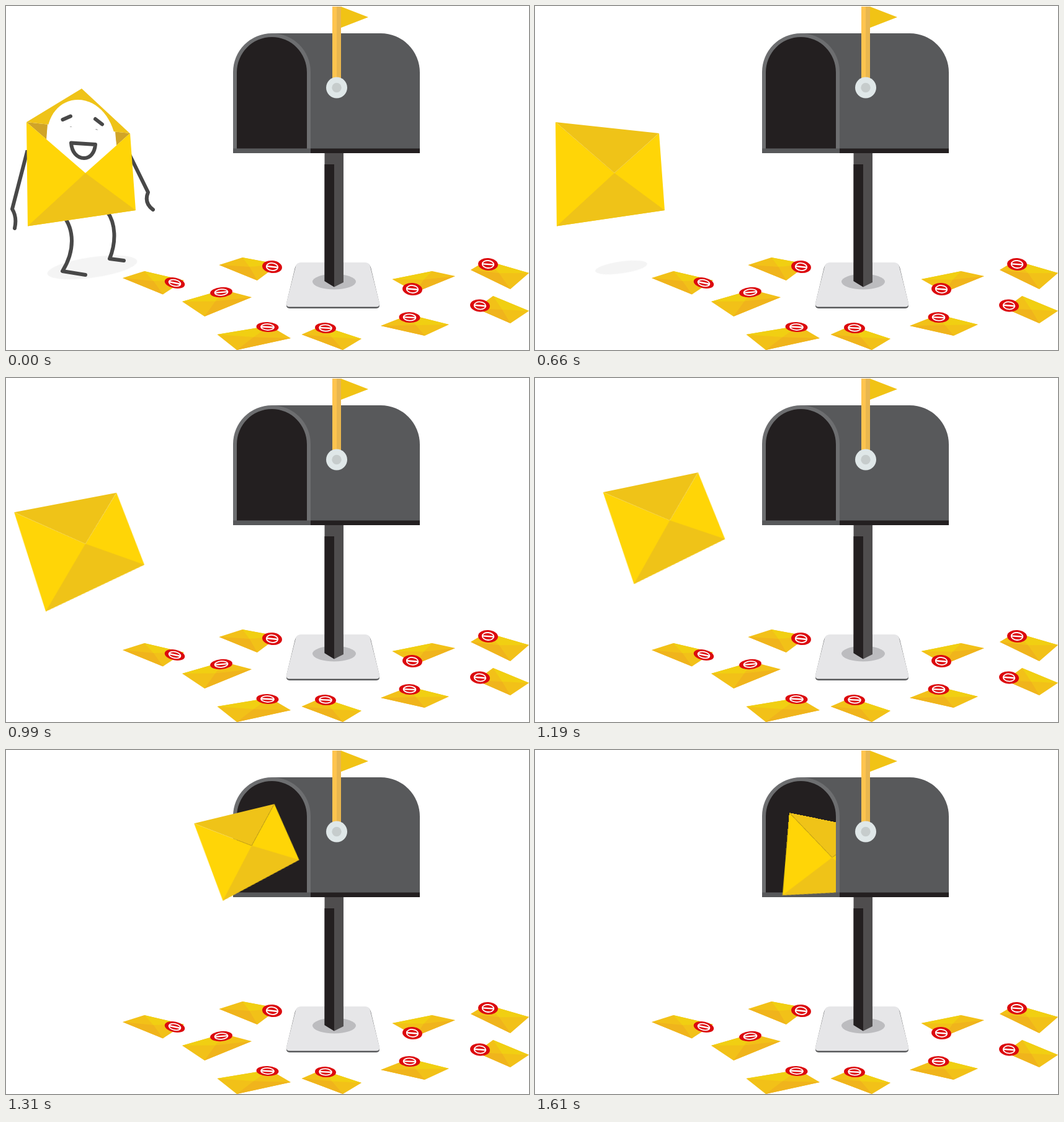
Write an HTML page that moves like this. It is 843 by 554 pixels and loops after 2.98 s.

```html
<!DOCTYPE html>
<html lang="en">
<head>
<meta charset="utf-8">
<title>Letter and mailbox</title>
<style>
html, body { margin: 0; width: 100%; height: 100%; overflow: hidden; background: #fff; }
svg { display: block; width: 100%; height: 100%; }

.letter, .flap, .limb, .open, .inner, .shadow { animation: 2980ms step-end infinite; }
.letter { animation-name: fly; }
.flap { animation-name: fold; }
.limb { animation-name: retract; fill: none; stroke: #484848; stroke-width: 6; stroke-linecap: round; stroke-linejoin: round; }
.open { animation-name: untilFold; }
.inner { animation-name: untilClosed; }
.shadow { animation-name: shrink; }

@keyframes fly {
  0% { transform: translate(128px, 269px) rotate(0deg) scale(1); }
  31.2081% { transform: translate(128px, 269px) rotate(0deg) scale(1); animation-timing-function: steps(3, start); }
  34.2282% { transform: translate(128px, 267px) rotate(-17deg) scale(1); }
  38.9262% { transform: translate(128px, 267px) rotate(-17deg) scale(1); animation-timing-function: steps(6, start); }
  44.9664% { transform: translate(396px, 154px) rotate(-19.8deg) scale(.793); animation-timing-function: steps(10, start); }
  55.0336%, 100% { transform: translate(479px, 173px) rotate(5.4deg) scale(.795); }
}
@keyframes fold {
  0% { transform: scaleY(0); }
  13.4228% { transform: scaleY(.164); }
  17.7852% { transform: scaleY(.58); }
  22.1477%, 100% { transform: scaleY(1); }
}
@keyframes retract {
  0% { transform: none; visibility: visible; }
  13.4228% { transform: translate(var(--dx), var(--dy)); visibility: visible; }
  17.7852% { transform: translate(calc(2 * var(--dx)), calc(2 * var(--dy))); visibility: visible; }
  22.1477%, 100% { transform: none; visibility: hidden; }
}
@keyframes untilFold {
  0% { visibility: visible; }
  13.4228%, 100% { visibility: hidden; }
}
@keyframes untilClosed {
  0% { visibility: visible; }
  22.1477%, 100% { visibility: hidden; }
}
@keyframes shrink {
  0% { transform: scale(1); }
  13.4228% { transform: scale(.88); }
  17.7852% { transform: scale(.73); }
  22.1477% { transform: scale(.58); }
  31.2081% { transform: scale(.58); animation-timing-function: steps(3, start); }
  34.2282%, 100% { transform: scale(0); }
}
</style>
</head>
<body>
<svg viewBox="0 0 843 554" preserveAspectRatio="none">
  <defs>
    <clipPath id="mouthEdge"><path d="M0 0H484.5V554H0z"/></clipPath>
    <clipPath id="belowShoulder"><path d="M0 232H300V554H0z"/></clipPath>
  </defs>

  <!-- mailbox -->
  <path fill="#58595b" d="M474 415H581Q586 415 588 421L602 479Q603 487 597 487H457Q451 487 452 479L466 421Q468 415 474 415z"/>
  <path fill="#e6e6e8" d="M475 413H579Q585 413 587 419L602 478Q603 484.500 597 484.500H457Q451 484.500 452 478L467 419Q469 413 475 413z"/>
  <ellipse cx="529" cy="444" rx="35" ry="12.500" fill="#bcbcbf"/>
  <path fill="#4f4d4e" d="M513.500 236H544V445L529 452.500L513.500 443z"/>
  <path fill="#231f20" d="M513.500 255H529V452.500L513.500 443z"/>
  <path fill="#58595b" d="M428 44H604A63 63 0 0 1 667 107V237H428z"/>
  <path fill="#231f20" d="M491 229.500H667V237H491z"/>
  <path fill="#6d6e70" d="M366 237V106.500A62.500 62.500 0 0 1 491 106.500V237z"/>
  <path fill="#58595b" d="M366 229.500H491V237H366z"/>
  <path fill="#231f20" d="M372 229.500V107A56.500 57 0 0 1 485 107V229.500z"/>
  <path fill="#fec44f" d="M526 1H533V120H526z"/>
  <path fill="#e9b64e" d="M533 1H540V120H533z"/>
  <path fill="#f1c315" d="M540 1L584 18L540 35z"/>
  <circle cx="533" cy="131.500" r="17" fill="#dfe7e8"/>
  <circle cx="533" cy="131.500" r="7.700" fill="#c6cccc"/>

  <g id="spam"></g>

  <!-- letter character -->
  <g transform="translate(139 421) rotate(-8)"><ellipse class="shadow" rx="73" ry="16.500" fill="#f4f4f4"/></g>
  <g clip-path="url(#belowShoulder)">
    <path class="limb" style="--dx:8px;--dy:-32px" d="M36 227L10 327Q18 340 14 358"/>
    <path class="limb" style="--dx:-8px;--dy:-16px" d="M194 229L229 300Q222 317 237 328"/>
    <path class="limb" style="--dx:0px;--dy:-23.500px" d="M91 336C111 360 111 395 91 427L128 433"/>
    <path class="limb" style="--dx:0px;--dy:-23.500px" d="M163 331C177 350 178 380 167 407L190 410"/>
  </g>
  <g clip-path="url(#mouthEdge)">
    <g class="letter">
      <g transform="translate(-128 -269)">
        <path fill="#d0a428" class="inner" d="M33 187L200 205L128 269z"/>
        <g class="open">
          <path fill="#efc318" d="M33 187L122 133L199.500 205z"/>
          <path fill="#fff" d="M66 216C64 175 88 151 116 151C148 151 175 182 178 226L128 269z"/>
          <path fill="none" stroke="#484848" stroke-width="6" stroke-linecap="round" d="M91.500 183L104 177.500M144 182L155 190.500"/>
          <ellipse cx="104.500" cy="199.500" rx="4.200" ry="5.200" fill="#484848" transform="rotate(-12 104.500 199.500)"/>
          <ellipse cx="146" cy="203.500" rx="4" ry="5" fill="#484848" transform="rotate(-12 146 203.500)"/>
        </g>
        <g class="inner">
          <path fill="#fff" d="M67 190.700L176 202.400L178 225L128 270L65 216z"/>
          <path fill="#fff" stroke="#484848" stroke-width="6" stroke-linejoin="round" d="M105 220.500L144 223C143 236 136 245 126 245C114 245 106 235 105 220.500z"/>
        </g>
        <path fill="#ffd507" d="M33 187L128 269L200 205L209 329L35 354.500z"/>
        <path fill="#efc318" d="M128 269L209 329L35 354.500z"/>
        <g transform="matrix(1 .1078 0 1 0 183.440)"><path class="flap" fill="#efc318" d="M33 0H200L128 72z"/></g>
      </g>
    </g>
  </g>
</svg>
<script>
// Corners start at the flap edge; stamp is [cx, cy, rx, ry, tilt].
const spam = [
  ["223,427 287,442 253,464.5 188,438", [272, 446, 16.5, 8.5, 12]],
  ["284,476 350,457 396,469 320,500", [347, 461, 18, 8, -5]],
  ["381,405 440,416 405,442 343.5,417", [429, 420, 16, 10, 6]],
  ["340.5,529 425,515 459,535 372,554", [421.5, 517, 18, 8, 3]],
  ["509,515 573,536 543,554 476.5,529", [515, 518.5, 17, 8.5, 3]],
  ["622.5,440 687,427 724,435 660,461", [655, 456, 16, 10, 5]],
  ["774,410 843,430 813,456 749,425", [777, 416, 16, 10, 4]],
  ["785,467 843,491 813,511 758,487", [764, 482.5, 16, 10, 5]],
  ["650,497 714,513 675,531 604,515", [650.5, 501.5, 17, 8.5, 2]]
];

function letter(points) {
  const p = points.split(" ");
  const mid = [0, 1].map(i => p.reduce((sum, q) => sum + +q.split(",")[i], 0) / 4);
  const tri = (a, b, fill) => `<polygon points="${a} ${b} ${mid}" fill="${fill}"/>`;
  return `<polygon points="${points}" fill="#f2c118"/>` +
    tri(p[0], p[1], "#f1cf12") + tri(p[2], p[3], "#f0b41c");
}

function stamp([x, y, rx, ry, tilt]) {
  const w = rx * .58, h = ry * .6;
  return `<g transform="translate(${x} ${y}) rotate(${tilt})">
    <ellipse rx="${rx}" ry="${ry}" fill="#dc0a0e"/>
    <ellipse rx="${w}" ry="${h}" fill="none" stroke="#fff" stroke-width="1.8"/>
    <path d="M${-w} 0H${w}" stroke="#fff" stroke-width="2.4"/></g>`;
}

document.getElementById("spam").innerHTML =
  spam.map(([points, mark]) => letter(points) + stamp(mark)).join("");
</script>
</body>
</html>
```
